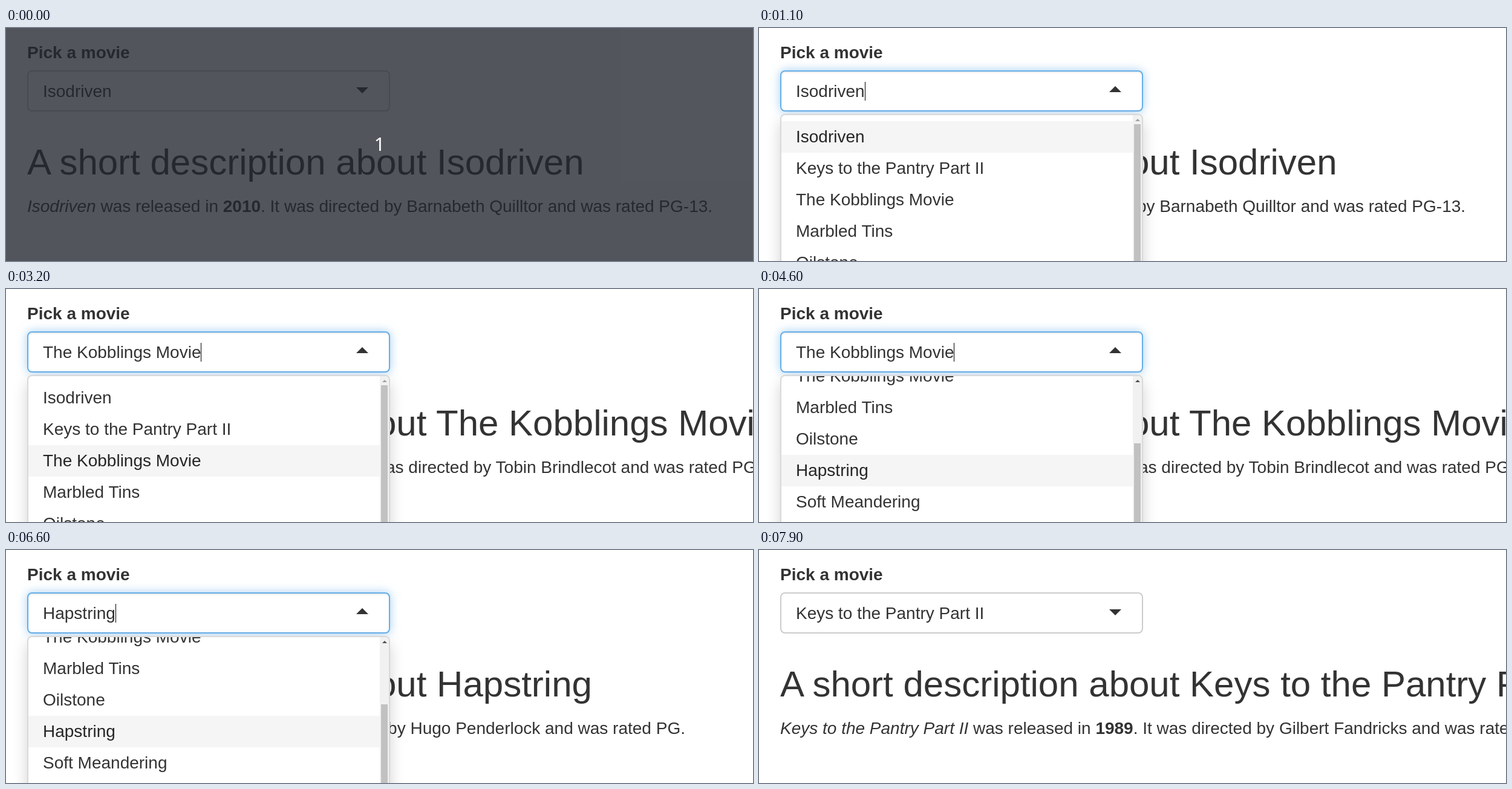
An HTML page that plays this animation: 1235 by 385 pixels, repeating every 8000 ms.

```html
<!DOCTYPE html>
<html lang="en">
<head>
<meta charset="utf-8">
<title>Movie picker</title>
<style>
  * { box-sizing: border-box; }
  html, body { margin: 0; width: 100%; height: 100%; overflow: hidden; background: #fff; }
  body { position: relative; color: #333; font: 28px/40px "Liberation Sans", Arial, sans-serif; white-space: nowrap; }
  body > *, #caret, #arrow, .bar, .bar * { position: absolute; }
  label { left: 35px; top: 21px; font-weight: bold; }

  #input { left: 35px; top: 70px; width: 600px; height: 68px; padding: 13px 24px;
    border: 2px solid #ccc; border-radius: 8px; background: #fff; }
  .open #input { border-color: #66afe9;
    box-shadow: inset 0 2px 2px rgba(0,0,0,.075), 0 0 16px rgba(102,175,233,.6); }
  #caret { top: 17px; width: 1px; height: 31px; background: #000; }
  #arrow { left: 542px; top: 26px; border: 10px solid transparent; border-top-color: #333; border-bottom: 0; }
  .open #arrow { top: 24px; border-top: 0; border-bottom: 10px solid #333; }

  h2 { left: 35px; top: 189px; margin: 0; font-size: 60px; line-height: 66px; font-weight: 500; }
  p { left: 35px; top: 275px; margin: 0; }

  #menu { display: none; left: 35px; top: 142px; width: 600px; height: 400px; overflow: hidden;
    border: 2px solid rgba(0,0,0,.15); border-radius: 8px; background: #fff;
    box-shadow: 0 12px 24px rgba(0,0,0,.175); }
  .open #menu { display: block; }
  #list { position: relative; padding-top: 10px; }
  #list div { height: 52px; padding: 6px 24px; }
  #list .hot { background: #f5f5f5; color: #262626; }
  .bar { right: 0; top: 0; width: 15px; height: 100%; background: #f1f1f1; }
  #up { left: 4px; top: 6px; border: 4px solid transparent; border-top: 0; border-bottom-color: #a3a3a3; }
  .scrolled #up { border-bottom-color: #505050; }
  #thumb { left: 2px; width: 11px; height: 270px; background: #c1c1c1; }

  #mask { display: none; inset: 0; background: rgba(35,38,47,.78); color: #fff;
    font: 31px/44px "Noto Sans", sans-serif; text-align: center; padding-top: 169px; }
  .masked #mask { display: block; }
</style>
</head>
<body>
<label>Pick a movie</label>
<div id="input"><span id="value"></span><span id="caret"></span><span id="arrow"></span></div>
<h2 id="head"></h2>
<p id="text"></p>
<div id="menu">
  <div id="list"></div>
  <div class="bar"><span id="up"></span><span id="thumb"></span></div>
</div>
<div id="mask">1</div>
<script>
const LOOP = 8000, BLINK = 600;
const $ = id => document.getElementById(id);

const movies = [
  ["Isodriven", 2010, "Barnabeth Quilltor", "PG-13"],
  ["Keys to the Pantry Part II", 1989, "Gilbert Fandricks", "PG"],
  ["The Kobblings Movie", 2007, "Tobin Brindlecot", "PG-13"],
  ["Marbled Tins"],
  ["Oilstone"],
  ["Hapstring", 2007, "Hugo Penderlock", "PG"],
  ["Soft Meandering"]
];

// Each cue overrides part of the state from its time on.
const cues = [
  [0, { masked: true, open: false, pick: 0, about: 0, hot: 0, scroll: 0 }],
  [100, { masked: false }],
  [1100, { open: true }],
  [1400, { hot: 1 }],
  [1600, { hot: 2 }],
  [2000, { open: false, pick: 2 }],
  [2100, { about: 2 }],
  [3200, { open: true }],
  [3500, { hot: 0 }],
  [3600, { hot: 1 }],
  [3800, { scroll: 24 }],
  [3900, { scroll: 92 }],
  [4000, { scroll: 130 }],
  [4100, { scroll: 140, hot: 3 }],
  [4500, { hot: 4 }],
  [4600, { hot: 5 }],
  [4800, { open: false, pick: 5 }],
  [4900, { about: 5 }],
  [6600, { open: true }],
  [6900, { hot: 2 }],
  [7000, { hot: 3 }],
  [7200, { scroll: 106 }],
  [7300, { scroll: 24 }],
  [7400, { scroll: 0, hot: 1 }],
  [7800, { open: false, pick: 1 }],
  [7900, { about: 1 }]
];

const rows = movies.map(([title]) => {
  const row = document.createElement("div");
  row.textContent = title;
  return $("list").appendChild(row);
});

function stateAt(t) {
  const state = {};
  let opened = 0;
  for (const [time, change] of cues) {
    if (time > t) break;
    Object.assign(state, change);
    if (change.open) opened = time;
  }
  state.caret = state.open && Math.floor((t - opened) / BLINK) % 2 === 0;
  return state;
}

function render(s) {
  const [title, year, director, rating] = movies[s.about];
  const classes = document.body.classList;
  classes.toggle("masked", s.masked);
  classes.toggle("open", s.open);
  classes.toggle("scrolled", s.scroll > 0);
  $("value").textContent = movies[s.pick][0];
  $("caret").style.visibility = s.caret ? "visible" : "hidden";
  $("head").textContent = `A short description about ${title}`;
  $("text").innerHTML = `<i>${title}</i> was released in <b>${year}</b>. ` +
    `It was directed by ${director} and was rated ${rating}.`;
  $("list").style.top = -s.scroll + "px";
  $("thumb").style.top = 15 + s.scroll * 96 / 140 + "px";
  rows.forEach((row, i) => row.classList.toggle("hot", i === s.hot));
}

const start = performance.now();
let shown = "";
function tick() {
  const state = stateAt((performance.now() - start) % LOOP);
  const key = JSON.stringify(state);
  if (key !== shown) {
    render(state);
    shown = key;
  }
  requestAnimationFrame(tick);
}
tick();
</script>
</body>
</html>
```
